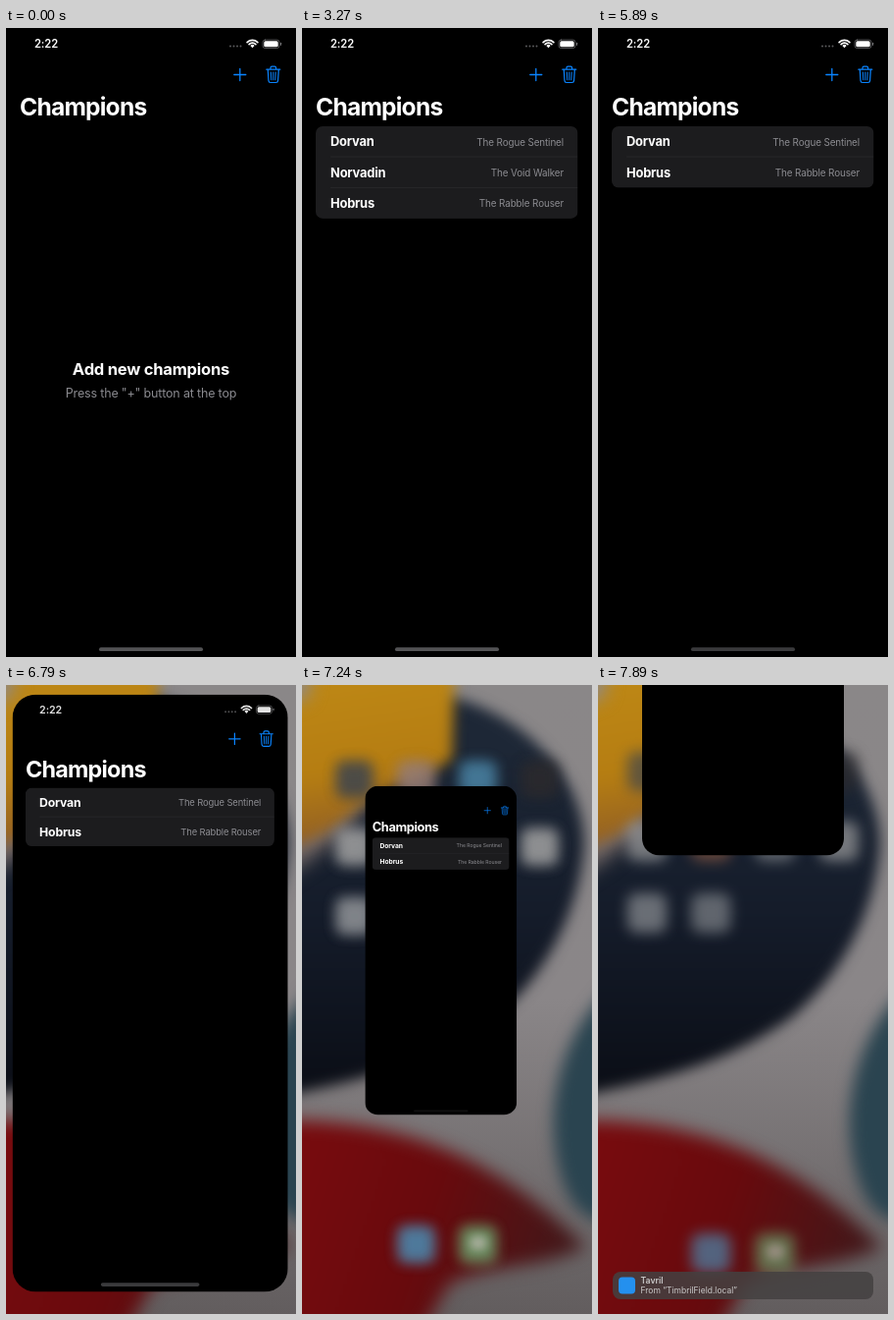
Recreate the animation shown at these times as an HTML page with a canvas. Size 296x640 px, loop 8 s.

```html
<!DOCTYPE html>
<html lang="en">
<head>
<meta charset="utf-8">
<title>Champions</title>
<style>
html, body { margin: 0; width: 100%; height: 100%; overflow: hidden; background: #000; }
canvas { display: block; width: 296px; height: 640px; }
</style>
</head>
<body>
<canvas id="stage"></canvas>
<script>
const W = 296, H = 640, LOOP = 8000, ROW = 31.3;
const LIST = { x: 14, y: 100, w: 267.5 };
const BLUE = '#0a84ff';
const dpr = window.devicePixelRatio || 1;

const stage = document.getElementById('stage');
stage.width = W * dpr;
stage.height = H * dpr;
const ctx = stage.getContext('2d');

// Bursts of motion: start, end, number of steps. Between them the screen rests.
const BURSTS = [
  [1080, 1190, 2], [2300, 2300, 1], [2540, 2650, 2], [2850, 3270, 5], [4100, 4330, 3],
  [4470, 5230, 8], [5330, 5890, 6], [6790, 7580, 8], [7680, 7890, 3]
];

function snap(t) {
  let out = 0;
  for (const [a, b, n] of BURSTS) {
    if (t < a) break;
    const gap = (b - a) / Math.max(1, n - 1);
    out = gap ? Math.min(b, a + gap * Math.floor((t - a) / gap + 0.1)) : a;
  }
  return out;
}

const ramp = (t, a, b) => Math.min(1, Math.max(0, (t - a) / (b - a)));
const smooth = p => p * p * (3 - 2 * p);
const easeOut = p => 1 - (1 - p) * (1 - p);
const mix = (a, b, p) => a + (b - a) * p;

function text(str, x, y, size, weight, color, spacing = 0, align = 'left') {
  ctx.font = `${weight} ${size}px Inter, "Liberation Sans", sans-serif`;
  ctx.letterSpacing = spacing + 'px';
  ctx.textAlign = align;
  ctx.fillStyle = color;
  ctx.fillText(str, x, y);
}

function box(c, x, y, w, h, r, color) {
  c.beginPath();
  c.roundRect(x, y, w, h, r);
  c.fillStyle = color;
  c.fill();
}

function withAlpha(a, draw) {
  if (a <= 0) return;
  ctx.save();
  ctx.globalAlpha *= a;
  draw();
  ctx.restore();
}

function layer(draw) {
  const c = document.createElement('canvas');
  c.width = W * dpr;
  c.height = H * dpr;
  const g = c.getContext('2d');
  g.scale(dpr, dpr);
  draw(g);
  return c;
}

function gradient(g, x0, y0, x1, y1, ...colors) {
  const fill = g.createLinearGradient(x0, y0, x1, y1);
  colors.forEach((c, i) => fill.addColorStop(i / (colors.length - 1), c));
  return fill;
}

const wallpaper = layer(g => {
  g.fillStyle = gradient(g, 0, 0, 0, H, '#8a8788', '#8a8688', '#625d5e');
  g.fillRect(0, 0, W, H);
  const blob = (path, fill, blur) => {
    g.filter = `blur(${blur * dpr}px)`;
    g.fillStyle = fill;
    g.fill(new Path2D(path));
  };
  blob('M-60 190 L110 10 C180 0 290 70 288 165 C282 235 245 300 195 340 C130 385 60 405 -60 425Z',
    gradient(g, 0, 60, 0, 420, '#1d2736', '#141b29', '#0a0d15'), 7);
  blob('M-60 130 L85 95 L45 150 L-60 225Z', '#786c69', 10);
  blob('M-60 -60 L157 -60 L153 75 C120 100 75 105 45 135 C20 155 0 165 -60 175Z',
    gradient(g, 0, 0, 30, 185, '#bd8715', '#b57d12', '#84542c'), 7);
  blob('M-40 -40 L12 -40 L6 12 L-40 30Z', '#8f8a88', 9);
  blob('M340 290 C270 330 238 430 268 510 C280 545 310 550 340 550Z', '#2a4450', 8);
  blob('M-60 445 C90 432 200 480 290 572 C240 596 190 588 150 610 L100 700 L-60 700Z',
    gradient(g, 0, 480, 270, 570, '#770b0e', '#680a0d', '#431719'), 9);
});

const homeIcons = layer(g => {
  g.filter = `blur(${7 * dpr}px)`;
  const rows = [
    [88, '#3c444f', '#967d76', '#4a84a5', '#2c2a2d'],
    [159, '#a2a2a2', '#8f5b43', '#85888c', '#a2a2a2'],
    [232, '#929599', '#84888d'],
    [578, '', '#4a8db4', '#6c9f6b']
  ];
  for (const [y, ...colors] of rows) {
    colors.forEach((c, i) => c && box(g, 50 + 65.3 * i - 20, y - 20, 40, 40, 9, c));
  }
  g.filter = `blur(${4 * dpr}px)`;
  box(g, 172, 569, 18, 15, 7, '#b4c8b2');
});

function statusBar() {
  text('2:22', 29, 20, 11.2, 600, '#fff', -0.1);
  for (let i = 0; i < 4; i++) box(ctx, 228 + i * 3.5, 17.6, 2, 2, 1, '#5a5a5c');
  ctx.strokeStyle = ctx.fillStyle = '#fff';
  ctx.lineWidth = 1.7;
  for (const r of [4.8, 7.6]) {
    ctx.beginPath();
    ctx.arc(251.5, 20, r, -Math.PI * 0.75, -Math.PI * 0.25);
    ctx.stroke();
  }
  ctx.beginPath();
  ctx.moveTo(251.5, 20.3);
  ctx.arc(251.5, 20, 3, -Math.PI * 0.75, -Math.PI * 0.25);
  ctx.fill();
  ctx.lineWidth = 0.7;
  ctx.strokeStyle = '#77777a';
  ctx.beginPath();
  ctx.roundRect(262, 12, 17, 8.6, 2.6);
  ctx.stroke();
  box(ctx, 263.3, 13.3, 14.4, 6, 1.6, '#fff');
  box(ctx, 280, 14.8, 1.1, 3, 0.5, '#77777a');
}

function toolbar(t) {
  const press = Math.min(ramp(t, 1000, 1190), 1 - ramp(t, 2450, 2650)) +
    Math.min(ramp(t, 2800, 2850), 1 - ramp(t, 2960, 3250));
  ctx.strokeStyle = BLUE;
  ctx.lineCap = ctx.lineJoin = 'round';
  ctx.lineWidth = 1.3;
  withAlpha(1 - 0.62 * press, () => ctx.stroke(new Path2D('M232.8 47.5H244.8 M238.8 41.5V53.5')));
  ctx.lineWidth = 1.2;
  ctx.stroke(new Path2D('M265.8 42.2H279.8 M270 42V40.6Q270 39.2 271.4 39.2H274.2Q275.6 39.2 275.6 40.6V42' +
    'M267.3 42.4L268 53.6Q268.1 55.5 270 55.5H275.6Q277.5 55.5 277.6 53.6L278.3 42.4'));
  ctx.lineWidth = 1;
  ctx.stroke(new Path2D('M270.4 45L270.7 52.8 M272.8 45V52.8 M275.2 45L274.9 52.8'));
}

function list(t) {
  if (t < 2300) return;
  const gone = easeOut(ramp(t, 4850, 5700));
  const swipe = 54 * smooth(ramp(t, 4020, 4400)) + 214 * smooth(ramp(t, 4720, 5060));
  const rows = [
    { name: 'Dorvan', role: 'The Rogue Sentinel', size: 1, shift: 0 },
    { name: 'Norvadin', role: 'The Void Walker', size: ramp(t, 2450, 2650) * (1 - gone), shift: swipe },
    { name: 'Hobrus', role: 'The Rabble Rouser', size: smooth(ramp(t, 2900, 3270)), shift: 0 }
  ].filter(r => r.size > 0.001);
  const { x, w } = LIST, right = x + w;
  const total = rows.reduce((sum, r) => sum + r.size * ROW, 0);

  ctx.save();
  ctx.beginPath();
  ctx.roundRect(x, LIST.y, w, total, 7);
  ctx.clip();
  ctx.fillStyle = '#1c1c1e';
  ctx.fillRect(x, LIST.y, w, total);
  let y = LIST.y;
  rows.forEach((r, i) => {
    const h = r.size * ROW;
    ctx.save();
    ctx.beginPath();
    ctx.rect(x, y, w, h);
    ctx.clip();
    withAlpha(r.size, () => {
      text(r.name, 29 - r.shift, y + 20.4, 12.9, 700, '#fff', -0.2);
      text(r.role, 267 - r.shift, y + 19.6, 9.9, 400, '#8c8c91', -0.12, 'right');
    });
    if (r.shift > 0) {
      ctx.fillStyle = '#ff453a';
      ctx.fillRect(right - r.shift, y, r.shift, h);
      text('Delete', right - r.shift + 27, y + 19.6, 10.7, 500, '#fff', 0, 'center');
    }
    ctx.restore();
    y += h;
    if (i < rows.length - 1) {
      ctx.fillStyle = '#2d2d30';
      ctx.fillRect(29 - r.shift, y - 0.6, right - 29, 0.6);
    }
  });
  ctx.restore();
}

function app(t) {
  ctx.fillStyle = '#000';
  ctx.fillRect(0, 0, W, H);
  withAlpha(1 - ramp(t, 6750, 7100), statusBar);
  toolbar(t);
  text('Champions', 14, 89, 24.6, 700, '#fff', -0.8);
  if (t < 2300) {
    text('Add new champions', W / 2, 353, 16.6, 700, '#fff', -0.25, 'center');
    text('Press the "+" button at the top', W / 2, 376, 12.5, 400, '#8a8a8f', -0.17, 'center');
  }
  list(t);
  withAlpha(1 - ramp(t, 7100, 7300), () =>
    box(ctx, 95, 630.3, 106, 3.8, 1.9, t < 5000 ? '#535355' : '#3a3a3c'));
}

// Centre, top edge and scale of the app card.
function cardPose(t) {
  const shrink = smooth(ramp(t, 6740, 7010));
  const settle = smooth(ramp(t, 7060, 7520));
  const fling = Math.pow(ramp(t, 7600, 7890), 1.5);
  return {
    cx: mix(mix(W / 2, 138.5, shrink), W / 2, settle),
    top: mix(mix(mix(0, 107, shrink), 95, settle), -272, fling),
    scale: mix(mix(mix(1, 0.4426, shrink), 0.6757, settle), 0.696, fling)
  };
}

function backdrop(t) {
  const settle = smooth(ramp(t, 7060, 7450));
  ctx.drawImage(wallpaper, 0, 0, W, H);
  ctx.save();
  ctx.translate(W / 2, H / 2);
  ctx.scale(mix(0.937, 1, settle), mix(0.937, 1, settle));
  ctx.globalAlpha = mix(1, 0.68, settle);
  ctx.drawImage(homeIcons, -W / 2, -H / 2, W, H);
  ctx.restore();
}

function banner() {
  box(ctx, 15, 597, 266, 28, 8, 'rgba(68,65,65,0.86)');
  box(ctx, 21, 602.5, 17, 17, 4, '#2490ee');
  text('Tavril', 43.5, 609.3, 8.7, 600, '#c9c7c7');
  text('From “TimbrilField.local”', 43.5, 619, 8.5, 400, '#c9c7c7');
}

function draw(t) {
  ctx.setTransform(dpr, 0, 0, dpr, 0, 0);
  if (t < 6790) return app(t);

  backdrop(t);
  const { cx, top, scale } = cardPose(t);
  const chrome = ramp(t, 7250, 7500);
  withAlpha(chrome, banner);
  ctx.save();
  ctx.translate(cx - W / 2 * scale, top);
  ctx.scale(scale, scale);
  ctx.beginPath();
  ctx.roundRect(0, 0, W, H, 25);
  ctx.clip();
  app(t);
  ctx.restore();
  withAlpha(chrome, () => {
    box(ctx, cx - 84, top - 24, 18, 18, 4, '#e4e4e4');
    text('Ruv', cx - 60.5, top - 11, 10.4, 600, '#fff');
  });
}

function tick() {
  draw(snap(performance.now() % LOOP));
  requestAnimationFrame(tick);
}
tick();
</script>
</body>
</html>
```
